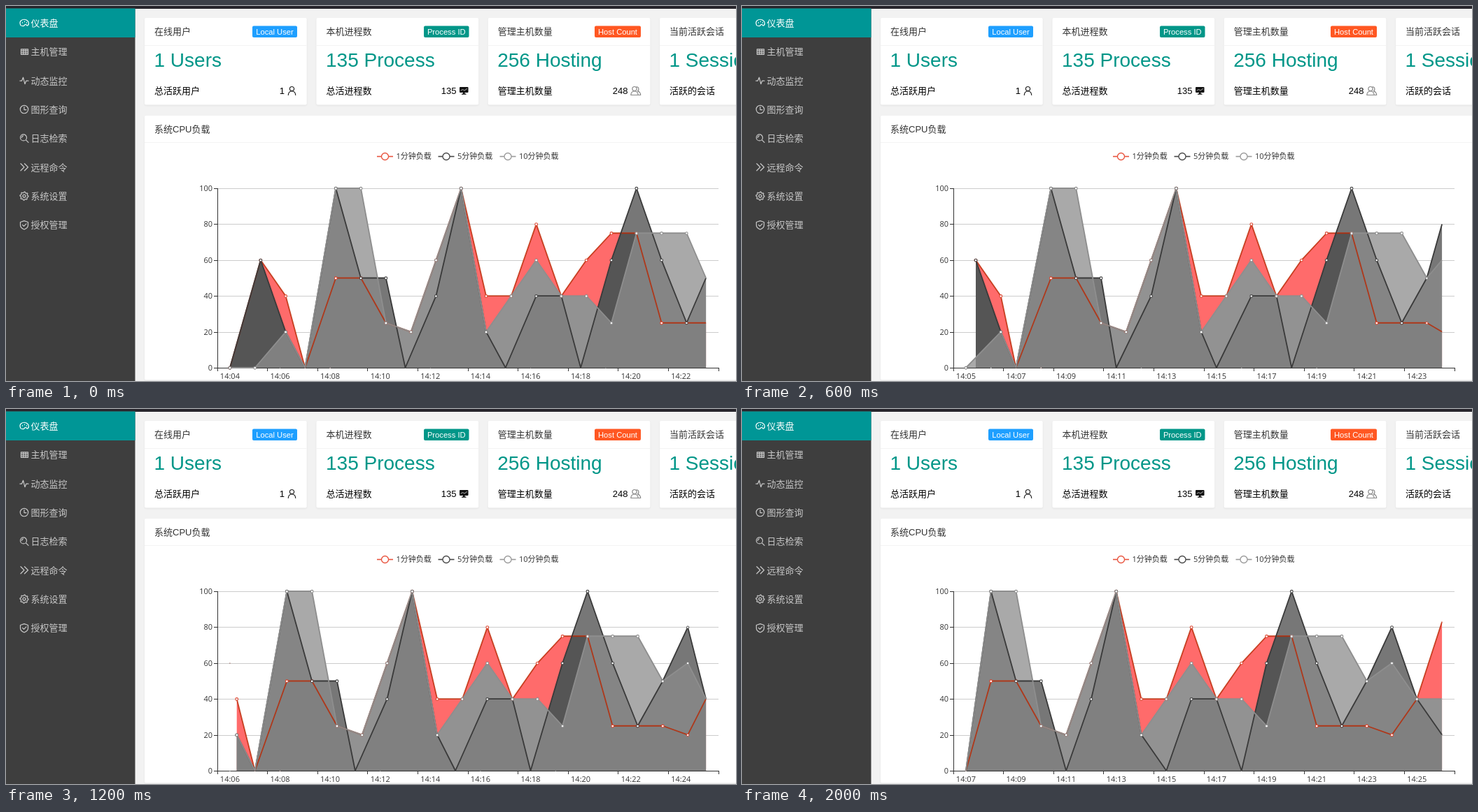
Write an HTML page with a canvas that moves like this. It is 1043 px wide and 537 px high and loops after 2100 ms.

```html
<!DOCTYPE html>
<html lang="zh-CN">
<head>
<meta charset="utf-8">
<title>仪表盘</title>
<style>
  html, body { margin: 0; width: 100%; height: 100%; overflow: hidden; background: #f2f2f2; }
  svg, canvas { position: absolute; left: 0; top: 0; width: 1043px; height: 537px; }
  text { font: 13px "Liberation Sans", "Noto Sans CJK SC", "Noto Sans CJK", sans-serif; white-space: pre; }
  .big { font-size: 28px; fill: #009688; }
  .badge { font-size: 11.2px; fill: #fff; text-anchor: middle; }
  .chart { font: 11px "Open Sans", "Noto Sans CJK SC", "Noto Sans CJK", sans-serif; fill: #333; }
  .mid { text-anchor: middle; }
  .end { text-anchor: end; }
  .card { fill: #fff; filter: drop-shadow(0 1px 1px rgba(0, 0, 0, .07)); }
  .icon { fill: none; stroke-width: 1.2; stroke-linecap: round; stroke-linejoin: round; }
</style>
</head>
<body>
<svg id="page" viewBox="0 0 1043 537"></svg>
<canvas id="plot" width="1043" height="537"></canvas>
<script>
const LOOP = 2100, FRAME = 100;
const UPDATES = [-117, 520, 1095, 1730];   // moments when a new sample arrives
const MOVE = 300, GROW = 1000;
const SLOTS = 20, LEFT = 302, STEP = 35.8, BASE = 518, UNIT = 2.57;

// The first entry of each list has already left the chart at the start.
const SERIES = [
  { name: '1分钟负载', x: 530, line: 'rgba(186,38,0,.8)', dot: '#dc4630',
    data: [0, 0, 60, 40, 0, 50, 50, 25, 20, 60, 100, 40, 40, 80, 40, 60, 75, 75, 25, 25, 25, 20, 40, 83] },
  { name: '5分钟负载', x: 617.5, line: '#3a3a3a', dot: '#444',
    data: [0, 0, 60, 20, 0, 100, 50, 50, 0, 40, 100, 20, 0, 40, 40, 0, 60, 100, 60, 25, 50, 80, 40, 20] },
  { name: '10分钟负载', x: 705.5, line: '#8e8e8e', dot: '#8a8a8a',
    data: [0, 0, 0, 20, 0, 100, 100, 25, 20, 60, 100, 20, 40, 60, 40, 40, 25, 75, 75, 75, 50, 60, 40, 40] }
];

const slotX = slot => LEFT + STEP * (slot + .5);
const valueY = value => BASE - value * UNIT;

const text = (x, y, str, cls = '', fill = '') =>
  `<text x="${x}" y="${y}" class="${cls}"${fill && ` fill="${fill}"`}>${str}</text>`;
const rect = (x, y, w, h, fill, extra = '') =>
  `<rect x="${x}" y="${y}" width="${w}" height="${h}" fill="${fill}" ${extra}/>`;
const line = (x1, y1, x2, y2, color, w = 1) =>
  `<path d="M${x1} ${y1}L${x2} ${y2}" stroke="${color}" stroke-width="${w}"/>`;
const icon = (x, y, d, color) =>
  `<path class="icon" transform="translate(${x} ${y})" d="${d}" stroke="${color}"/>`;
const ring = (x, y, r) => `M${x - r} ${y}a${r} ${r} 0 1 0 ${2 * r} 0a${r} ${r} 0 1 0 ${-2 * r} 0`;

const gear = () => {
  let d = ring(6.5, 6.5, 2);
  for (let i = 0; i <= 32; i++) {
    const a = i * Math.PI / 16, r = i % 4 < 2 ? 6 : 4.7;
    d += `${i ? 'L' : 'M'}${(6.5 + r * Math.cos(a)).toFixed(2)} ${(6.5 + r * Math.sin(a)).toFixed(2)}`;
  }
  return d;
};

const MENU = [
  ['仪表盘', 'M1 9C-1 4 4 1 8 2C13 3 14 8 12 10C10 12 10 8 8 9C6 10 7 12 4 11C2 11 1 10 1 9M4 6v.6M7 4.5v.6M10 6v.6'],
  ['主机管理', 'M2 3h10v7.5h-10zM2 5.3h10M2 8h10M5.3 3v7.5M8.7 3v7.5'],
  ['动态监控', 'M.5 7h2.5L5 2L7.5 11.5L9.3 7H12.5'],
  ['图形查询', ring(6.5, 6.5, 5.7) + 'M6.5 3v4h3'],
  ['日志检索', ring(5.5, 5.5, 4.5) + 'M9 9l3.5 3.5M3 5.5a2.5 2.5 0 0 1 2-2.5'],
  ['远程命令', 'M1.5 1.5L6.5 6.5L1.5 11.5M7 1.5L12 6.5L7 11.5'],
  ['系统设置', gear()],
  ['授权管理', 'M6.5 .7L12 2.5V7C12 10 9 12 6.5 13C4 12 1 10 1 7V2.5ZM4 6.5l2 2L9.5 5']
];

const PERSON = ring(6, 3.6, 3.1) + 'M.8 12.5C1 9 3 7 6 7S11 9 11.2 12.5';
const CARDS = [
  { x: 198, title: '在线用户', badge: 'Local User', color: '#1e9fff', bx: 352, bw: 64,
    big: '1 Users', foot: '总活跃用户', count: '1', cx: 398, art: icon(402.5, 115, PERSON, '#222') },
  { x: 443.5, title: '本机进程数', badge: 'Process ID', color: '#009688', bx: 597, bw: 64.5,
    big: '135 Process', foot: '总活进程数', count: '135', cx: 643.5,
    art: rect(648, 116, 12.5, 8, '#111', 'rx="1"') + rect(653, 124, 2.5, 2, '#111') +
      rect(651, 125.5, 6.5, 1.3, '#111') + icon(650, 118, 'M0 3l2.5-1.5L5 3l3.5-2.5', '#888') },
  { x: 688.7, title: '管理主机数量', badge: 'Host Count', color: '#ff5722', bx: 841, bw: 66,
    big: '256 Hosting', foot: '管理主机数量', count: '248', cx: 888.5,
    art: icon(892, 115, PERSON + 'M8.5 1C12 0 13 5 10.5 6.8C13 7.5 14.5 9.5 14.7 12.5H.8', '#888') },
  { x: 934, title: '当前活跃会话', big: '1 Sessions', foot: '活跃的会话' }
];

function menuItem([label, path], i) {
  const y = 24 + i * 41.35, color = i ? '#c8c8c8' : '#fff';
  return icon(19.5, y - 6.5, path, color) + text(35.5, y + 4.8, label, '', color);
}

function card(c) {
  const x = c.x + 14;
  let out = rect(c.x, 17, 231.7, 124.5, '#fff', 'class="card" rx="2"') +
    line(c.x, 56.5, c.x + 231.7, 56.5, '#f3f3f3') +
    text(x, 41, c.title, '', '#333') + text(x - .5, 87, c.big, 'big') + text(x, 126, c.foot, '', '#000');
  if (c.badge) {
    out += rect(c.bx, 28.5, c.bw, 16.5, c.color, 'rx="2"') +
      text(c.bx + c.bw / 2, 41, c.badge, 'badge') + text(c.cx, 126, c.count, 'end', '#000') + c.art;
  }
  return out;
}

function legend(s, i) {
  const color = ['#e8523c', '#444', '#999'][i];
  return line(s.x, 215.5, s.x + 23, 215.5, color, 1.6) +
    `<circle cx="${s.x + 11.5}" cy="215.5" r="5" fill="#fff" stroke="${color}" stroke-width="1.3"/>` +
    text(s.x + 27.5, 219.3, s.name, 'chart');
}

function axes() {
  let out = '';
  for (let v = 0; v <= 100; v += 20) {
    const y = Math.round(valueY(v)) + .5;
    out += line(LEFT, y, 1018, y, v ? '#ccc' : '#333') + line(297, y, LEFT, y, '#333') +
      text(295, y + 3, v, 'chart end');
  }
  out += line(302.5, 261, 302.5, 518, '#333');
  for (let i = 0; i <= 10; i++) {
    const x = Math.floor(LEFT + i * STEP * 2) + .5;
    out += line(x, 518, x, 523, '#333');
    if (i < 10) out += text(slotX(i * 2), 533.5, '', 'chart mid time');
  }
  return out;
}

document.getElementById('page').innerHTML =
  rect(0, 0, 1043, 537, '#f2f2f2') + rect(0, 0, 1043, 4, '#27252c') +
  rect(0, 3, 184.5, 534, '#3e3e3e') + rect(0, 3.5, 184.5, 41.5, '#009696') +
  MENU.map(menuItem).join('') + CARDS.map(card).join('') +
  rect(198, 157, 860, 378.5, '#fff', 'class="card" rx="2"') +
  line(198, 195.5, 1043, 195.5, '#f3f3f3') + text(212, 180.5, '系统CPU负载', '', '#333') +
  SERIES.map(legend).join('') + axes();

const times = [...document.querySelectorAll('.time')];
const ctx = document.getElementById('plot').getContext('2d');
ctx.lineJoin = 'bevel';

// Fills the area shared by all given shapes.
function fillShared(color, ...shapes) {
  ctx.save();
  shapes.slice(1).forEach(shape => ctx.clip(shape));
  ctx.fillStyle = color;
  ctx.fill(shapes[0]);
  ctx.restore();
}

function drawDot(x, value, scale, color) {
  if (scale < .02) return;
  ctx.beginPath();
  ctx.arc(x, valueY(value) + .3, 1.9 * scale, 0, 2 * Math.PI);
  ctx.fillStyle = '#fff';
  ctx.fill();
  ctx.lineWidth = 1.1 * scale;
  ctx.strokeStyle = color;
  ctx.stroke();
}

// Zero values and the newest sample stay in their slots; all others slide left.
function layout(data, shift, age, rest) {
  const points = [], dots = [];
  for (let slot = 0; slot < SLOTS; slot++) {
    const value = data[shift + 1 + slot], before = data[shift + slot];
    const fixed = value === 0 || slot === SLOTS - 1;
    const same = value === 0 && before === 0;
    const x = slotX(slot) + (fixed ? 0 : STEP * rest);
    let scale = 1;
    if (fixed && !same) scale = Math.min(1, age / GROW);
    else if (slot === SLOTS - 2) scale = 1 - .4 * rest;
    points.push([x, value]);
    if (!same && (slot === 0 || before === 0)) dots.push([slotX(slot), before, rest]);
    dots.push([x, value, scale]);
  }
  const stroke = new Path2D(), area = new Path2D();
  area.moveTo(points[0][0], BASE);
  points.forEach(([x, v], i) => {
    stroke[i ? 'lineTo' : 'moveTo'](x, valueY(v));
    area.lineTo(x, valueY(v));
  });
  area.lineTo(points[SLOTS - 1][0], BASE);
  area.closePath();
  return { stroke, area, dots };
}

function draw(t) {
  const shift = UPDATES.filter(start => start <= t).length - 1;
  const age = t - UPDATES[shift];
  const rest = (1 - Math.min(1, age / MOVE)) ** 3;
  times.forEach((label, i) => {
    label.textContent = '14:' + String(4 + shift + i * 2).padStart(2, '0');
  });

  ctx.clearRect(0, 0, 1043, 537);
  const shapes = SERIES.map(s => layout(s.data, shift, age, rest));
  const [red, dark, grey] = shapes.map(s => s.area);
  fillShared('#ff6b6b', red);
  fillShared('#777', dark);
  fillShared('#555', dark, red);
  fillShared('#a9a9a9', grey);
  fillShared('#929292', grey, red);
  fillShared('#858585', grey, dark);
  fillShared('#808080', grey, dark, red);

  ctx.lineWidth = 1.8;
  shapes.forEach((shape, i) => {
    ctx.strokeStyle = SERIES[i].line;
    ctx.stroke(shape.stroke);
  });
  shapes.forEach((shape, i) => shape.dots.forEach(dot => drawDot(...dot, SERIES[i].dot)));
}

const begin = performance.now();
function tick() {
  const t = (performance.now() - begin) % LOOP;
  draw(Math.floor(t / FRAME) * FRAME);
  requestAnimationFrame(tick);
}
tick();
</script>
</body>
</html>
```
